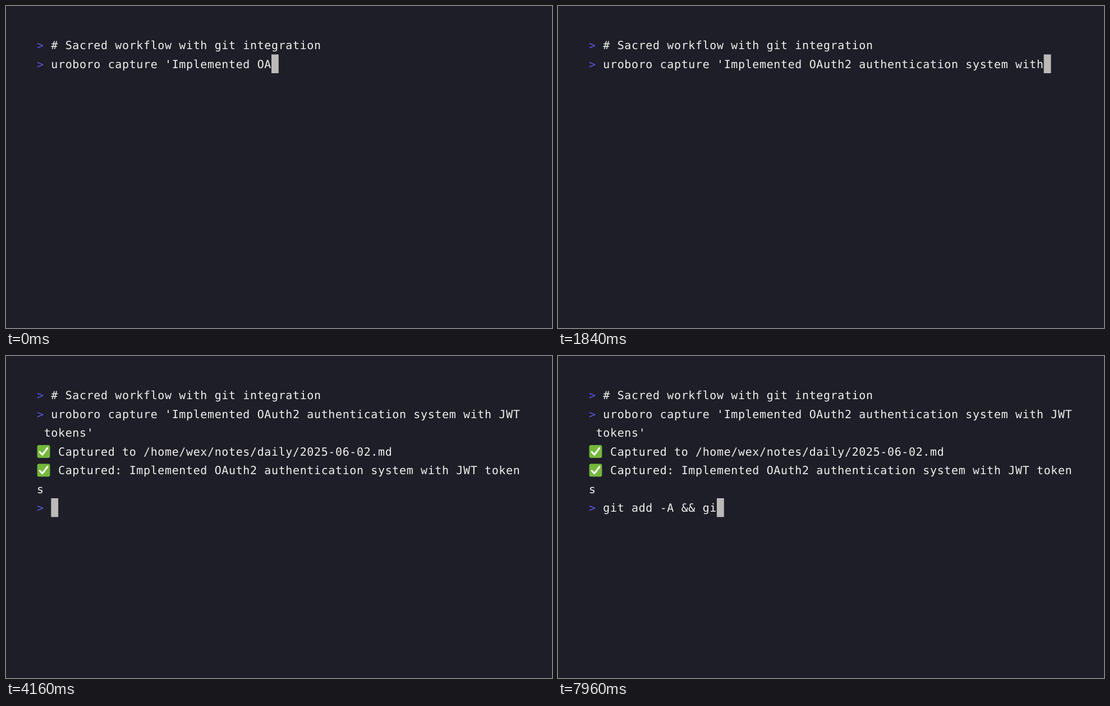
An HTML page that plays this animation: 973 px wide and 575 px high, repeating every 8000 ms.

```html
<!DOCTYPE html>
<html lang="en">
<head>
<meta charset="utf-8">
<title>Terminal</title>
<style>
  html, body { margin: 0; width: 100%; height: 100%; overflow: hidden; background: #1e1e28; }
  svg { display: block; }
  text {
    font: 20px "DejaVu Sans Mono", monospace; letter-spacing: .626px;
    white-space: pre; text-rendering: geometricPrecision; fill: #f1f1ee;
  }
  tspan { fill: #5a56e0; }
</style>
</head>
<body>
<svg width="973" height="575" viewBox="0 0 973 575">
  <defs>
    <g id="tick">
      <rect x=".6" y=".6" width="22.8" height="22.8" rx="3" fill="#74b83c"/>
      <path d="M5.2 12.8l4.6 5L18.8 6" fill="none" stroke="#fff" stroke-width="3.1" stroke-linecap="round" stroke-linejoin="round"/>
    </g>
  </defs>
  <rect id="cursor" width="12.8" height="33.5" fill="#bcbab9"/>
  <g id="screen"></g>
  <g id="ticks">
    <use href="#tick" x="55" y="158.5"/>
    <use href="#tick" x="55" y="192"/>
  </g>
</svg>
<script>
const LOOP = 8000, TICK = 40, COLS = 68, CELL_W = 12.667, CELL_H = 33.5;
const LEFT = 55, TOP = 53, BASELINE = 24;
const capture = "uroboro capture 'Implemented OAuth2 authentication system with JWT tokens'";
const commit = "git add -A && gi";
const output = [
  "   Captured to /home/wex/notes/daily/2025-06-02.md",
  "   Captured: Implemented OAuth2 authentication system with JWT token",
  "s"
];
const blinks = [3160, 3720, 4720, 5280, 5880, 6480];

const screen = document.getElementById("screen");
const cursor = document.getElementById("cursor");
const ticks = document.getElementById("ticks");

// Moments at which the n-th key of each command appears
const captureKey = n => 60 * n + 5 * Math.cos((n - 22) * 0.37);
const commitKey = n => 7039 + 61.42 * (n - 1);

function keysBy(time, keyTime, max) {
  let n = 0;
  while (n < max && Math.floor(keyTime(n + 1) / TICK) * TICK <= time) n++;
  return n;
}

const prompt = text => "> " + text;
const rowTop = row => TOP + row * CELL_H;
const show = (node, visible) => node.setAttribute("visibility", visible ? "visible" : "hidden");

function textRow(line, row) {
  const markup = line.replace(/&/g, "&amp;").replace(/^>/, "<tspan>&gt;</tspan>");
  return `<text x="${LEFT}" y="${rowTop(row) + BASELINE}">${markup}</text>`;
}

function render(time) {
  const typed = prompt(capture.slice(0, 31 + keysBy(time, captureKey, capture.length - 31)));
  const lines = [prompt("# Sacred workflow with git integration"), typed.slice(0, COLS)];
  if (typed.length >= COLS) lines.push(typed.slice(COLS));
  if (time >= 4080) {
    if (time >= 4120) lines.push(...output);
    lines.push(time < 4160 ? "" : prompt(commit.slice(0, keysBy(time, commitKey, commit.length))));
  }
  screen.innerHTML = lines.map(textRow).join("");
  show(ticks, time >= 4120);

  const row = lines.length - 1;
  cursor.setAttribute("x", LEFT + lines[row].length * CELL_W);
  cursor.setAttribute("y", rowTop(row));
  show(cursor, blinks.filter(b => b <= time).length % 2 === 0);
}

let start;
function frame(now) {
  start ??= now;
  render((now - start) % LOOP);
  requestAnimationFrame(frame);
}
render(0);
requestAnimationFrame(frame);
</script>
</body>
</html>
```
